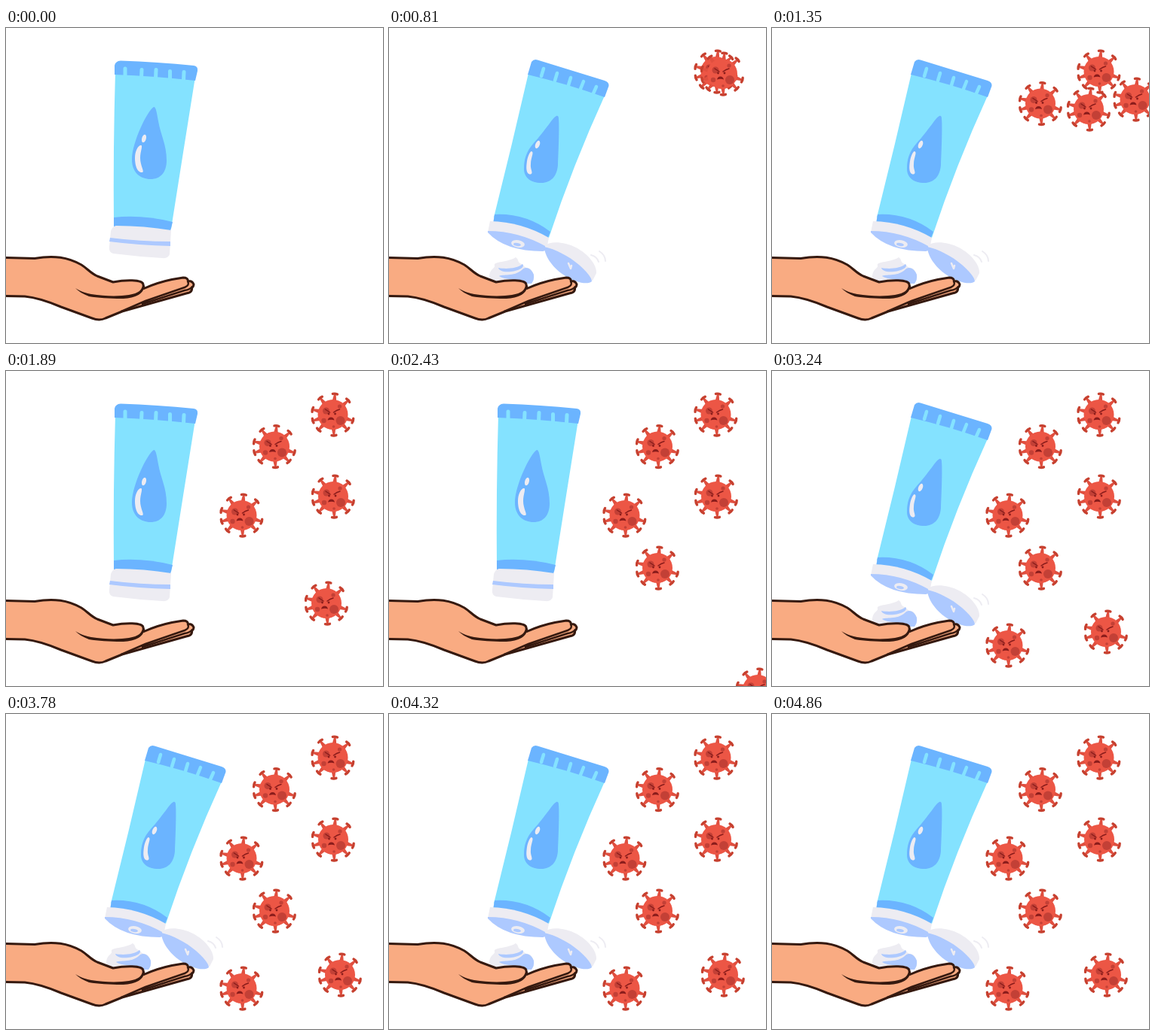
An HTML page that plays this animation: 500x419 px, repeating every 5.13 s.

```html
<!DOCTYPE html>
<html lang="en">
<head>
<meta charset="utf-8">
<title>Hand cream and germs</title>
<style>
  html, body { margin: 0; width: 100%; height: 100%; overflow: hidden; background: #fff; }
  svg { display: block; width: 100%; height: 100%; }
  .body { fill: #84e2ff; }
  .band { fill: #6bb4ff; }
  .white { fill: #edecf2; }
  .pale { fill: #adc9ff; }
  .line { fill: none; stroke-linecap: round; stroke-linejoin: round; }
</style>
</head>
<body>
<svg viewBox="0 0 500 419">
  <defs>
    <g id="germ">
      <g id="spikes"></g>
      <circle r="20" fill="#ec5645"/>
      <g fill="#c34036">
        <circle cx="10" cy="8" r="6"/>
        <circle cx="-9" cy="-5" r="4.5"/>
        <circle cx="-12" cy="8" r="3.2"/>
        <circle cx="9" cy="-11" r="2.6"/>
        <circle cx="1" cy="16" r="1.8"/>
      </g>
      <path class="line" d="M-10-7-4-3M9-7Q5-6 1-3" stroke="#8a1c1b" stroke-width="1.5"/>
      <g fill="#8a1c1b">
        <circle cx="-5.500" cy="-1" r="1.400"/>
        <circle cx="3" cy="-1" r="1.400"/>
        <path d="M-7 7.500Q-6 3.500-2.500 3.500 1 3.500 2 7.500-2 6-7 7.500Z"/>
      </g>
    </g>
  </defs>

  <g id="closed">
    <path class="body" d="M145 58 251 65Q235 165 219 267L143 264Q142 160 145 58Z"/>
    <path class="band" d="M144 50Q145 44 152 43.500 201 45 249 50 255 51 254 57L251 70Q198 64 144 62Z"/>
    <path class="line" d="M158 54V64M180 55.500 179.500 66M199 55.500 198.500 67M217.500 57.500V68M236 58.500 235.500 69" stroke="#84e2ff" stroke-width="5"/>
    <path class="band" d="M143 252Q180 248 221 258L218 270 143 265Z"/>
    <path class="white" d="M146 263Q183 263 219 269L217 301Q215 307 207 306 174 304 142 300 136 298 137 291L139 270Q141 264 146 263Z"/>
    <path class="pale" d="M138 279Q178 284 218 284V290Q176 289 137 284Z"/>
    <path class="band" d="M196 105C199 105 200 113 202 124 205 142 213 155 213 176 213 193 204 201 192 201 178 201 167 192 167 175 167 152 188 109 196 105Z"/>
    <ellipse class="white" cx="183" cy="147" rx="2.800" ry="5.500" transform="rotate(15 183 147)"/>
    <path class="white" d="M179 156C182 156 178 164 178 173 178 183 184 191 181 192 173 193 171 180 171 173 171 164 175 156 179 156Z"/>
  </g>

  <g id="open">
    <path class="body" d="M185 60 286 90Q244 182 212 279L139 252Q163 156 185 60Z"/>
    <path class="band" d="M189 45Q192 41 197 42.500L286 70Q292 72 291.500 77L286 92Q235 74 184 62Z"/>
    <path class="line" d="M205 54 202 64M223 60 220 70M241 66 238 76M258 71 254 81M275 78 271 87" stroke="#84e2ff" stroke-width="4.500"/>
    <path class="band" d="M140 248Q181 246 214 271L210 281Q178 260 138 260Z"/>
    <path class="white" d="M134 257Q176 258 212 279L209 294 131 272Z"/>
    <path class="pale" d="M131 270Q172 270 209 291 210 296 204 297 154 297 131 272Z"/>
    <ellipse class="white" cx="171" cy="287" rx="9" ry="4.800" transform="rotate(10 171 287)"/>
    <ellipse class="pale" cx="170" cy="288" rx="5" ry="2" transform="rotate(10 170 288)"/>
    <path class="band" d="M222 117C218 118 207 137 192 153 182 164 179 175 179 187 179 199 188 206 202 206 215 206 223 197 224 182 225 160 226 130 225 121Q225 116 222 117Z"/>
    <ellipse class="white" cx="197" cy="155" rx="2.800" ry="5.500" transform="rotate(22 197 155)"/>
    <path class="white" d="M189 164C193 165 188 172 188 181 187 188 192 193 188 194.500 181 195 182 184 183 177 184 171 187 164 189 164Z"/>
    <path class="white" d="M207 289C214 283 233 284 248 292 265 301 276 316 275 326L270 336 207 294Z"/>
    <path class="pale" d="M206 291C220 294 238 303 252 315 262 324 269 332 269 337 264 342 247 339 231 328 216 318 206 302 206 291Z"/>
    <path class="line" d="M238 313 241 320 242 316" stroke="#edecf2" stroke-width="2.500"/>
    <path class="line" d="M279 297Q287 302 287 310M268 302Q276 304 278 311" stroke="#edecf2" stroke-width="2"/>
    <path class="white" d="M133 332C133 320 141 320 140 316 138 310 158 312 168 305 173 308 169 311 176 314 180 317 180 319 187 320 194 326 192 336 188 340H137Z"/>
    <path class="pale" d="M192 328C188 318 180 317 176 322 166 331 150 327 146 330 150 333 160 334 165 335L160 340H189Q193 335 192 328ZM145 319C155 321 170 320 177 314 181 318 172 323 162 324 152 325 146 323 145 319Z"/>
  </g>

  <g class="line" stroke="#35190f" stroke-width="3">
    <path fill="#f9ab82" d="M-5 305.500 38 306.500C64 302 82 305 100 315 108 320 112 326 121 330L142 338C157 335 181 334 182 341L183 346.500C195 341 208 337 220 334.500L235 332Q241 332 241.500 336.500 247 336 249 341 249 344 246.500 346 247 350 243 352L239 353 154 377 132 386Q124 390 114 386L73 371Q45 359 25 357L-5 356.500Z"/>
    <path d="M241 337Q244 342 237 345L185 363 153 377M247 344Q244 348 237 349L181 367" stroke-width="2.500"/>
    <path fill="#35190f" stroke="none" d="M92 346C100 351 107 353 113 354 131 357 151 357 163 355 176 353 181 348 181 341L183.500 343C183 355 168 360 153 360 138 360 121 359 110 357 102 354 96 350 92 346Z"/>
  </g>

  <g id="germs"></g>
</svg>
<script>
const STEP = 270, STEPS = 19;
const $ = id => document.getElementById(id);

// Each germ is a list of stops: x, y, first step shown there
const paths = [
  [[482, 40, 1], [433.5, 58, 3]],
  [[442, 61, 2], [356, 100.5, 5]],
  [[420, 108, 5], [312.5, 192, 6]],
  [[481.5, 95, 4], [434, 167, 6]],
  [[443, 382, 6], [425, 309, 7], [356, 262, 9]],
  [[489, 424, 8], [443, 347, 11]],
  [[427, 433, 10], [312.5, 365, 12]]
];

$("spikes").innerHTML = [-84, -43, 17, 46, 87, 133, 163, 194, 233].map(angle =>
  `<g transform="rotate(${angle})">
    <path d="M17-3 27-1.300V1.300L17 3Z" fill="#e04f3f"/>
    <path class="line" d="M27.500-3Q28.500 0 27.500 3" stroke="#c6402f" stroke-width="3.4"/>
  </g>`).join("");
$("germs").innerHTML = paths.map(() => '<use href="#germ"/>').join("");
const germs = [...$("germs").children];

const show = (el, on) => el.setAttribute("display", on ? "inline" : "none");

function draw(now) {
  const step = Math.floor(now / STEP) % STEPS;
  const isOpen = (step >= 3 && step < 7) || (step >= 12 && step % 2 === 0);
  show($("open"), isOpen);
  show($("closed"), !isOpen);
  paths.forEach((path, i) => {
    const stop = path.filter(([, , first]) => first <= step).pop();
    show(germs[i], stop);
    if (stop) germs[i].setAttribute("transform", `translate(${stop[0]} ${stop[1]})`);
  });
}

const start = performance.now();
function tick() {
  draw(performance.now() - start);
  requestAnimationFrame(tick);
}
tick();
</script>
</body>
</html>
```
